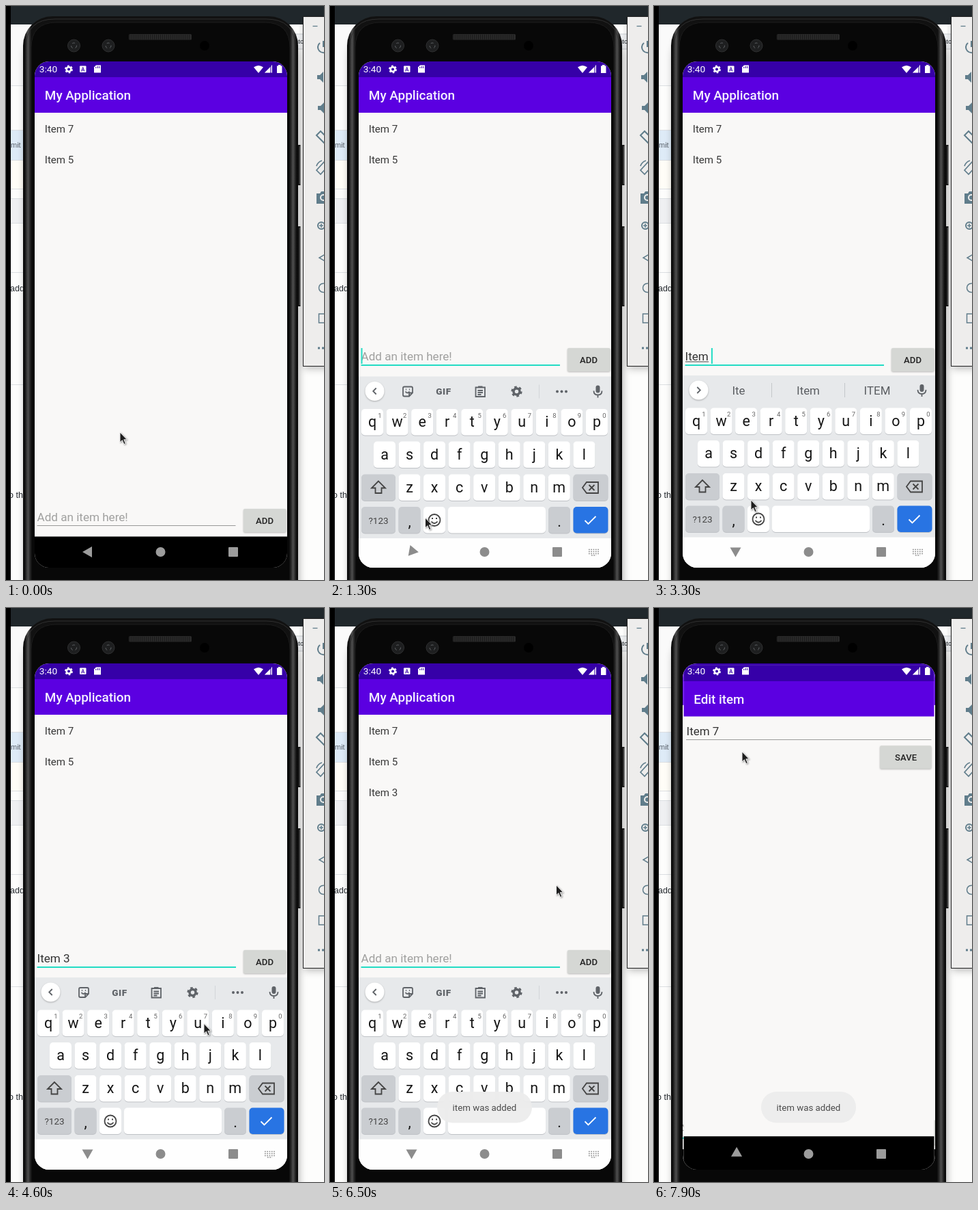
Write an HTML page that moves like this. It is 466x839 px and loops after 8 s.

```html
<!DOCTYPE html>
<html lang="en">
<head>
<meta charset="utf-8">
<title>Item list</title>
<style>
html, body { margin: 0; width: 100%; height: 100%; overflow: hidden; background: #fdfdfc; }
svg { display: block; width: 100vw; height: 100vh; }
text { font-family: Roboto, "Noto Sans", sans-serif; white-space: pre; }
.page { font-family: "Liberation Sans", Arial, sans-serif; font-size: 12.5px; fill: #24292e; }
.title { font-size: 18.95px; font-weight: 500; fill: #f6f2ff; }
.item { font-size: 15.1px; fill: #373737; }
.input { font-size: 17.1px; fill: #333; }
.button { font-size: 13.2px; font-weight: 500; fill: #222; text-anchor: middle; }
.raised { filter: drop-shadow(0 1px 1px #0004); }
.key { font-size: 21.5px; fill: #151515; text-anchor: middle; }
.digit { font-size: 9.5px; fill: #666; text-anchor: middle; }
.hint { font-size: 16.9px; fill: #5b5e62; text-anchor: middle; }
.line { fill: none; stroke: #5f6368; stroke-width: 1.8; }
.tool { fill: none; stroke: #607d8b; stroke-width: 2; }
#pointer { filter: drop-shadow(1px 1px 1px #0006); }
</style>
</head>
<body>
<svg viewBox="0 0 466 839" preserveAspectRatio="none">
  <defs>
    <clipPath id="screen"><rect x="42" y="81" width="370" height="740" rx="21"/></clipPath>
    <filter id="blur" x="-20%" width="140%"><feGaussianBlur stdDeviation="6"/></filter>
    <linearGradient id="rim" x1="25" x2="428" gradientUnits="userSpaceOnUse">
      <stop offset="0" stop-color="#050505"/><stop offset=".008" stop-color="#161616"/>
      <stop offset=".018" stop-color="#505050"/><stop offset=".03" stop-color="#111"/>
      <stop offset=".97" stop-color="#111"/><stop offset=".982" stop-color="#505050"/>
      <stop offset=".992" stop-color="#161616"/><stop offset="1" stop-color="#050505"/>
    </linearGradient>
    <g id="gear">
      <circle r="3.6" fill="none" stroke="currentColor" stroke-width="2.8"/>
      <circle r="5.5" fill="none" stroke="currentColor" stroke-width="2" stroke-dasharray="2.88"/>
    </g>
    <g id="window">
      <rect x="42" y="80" width="370" height="741" fill="#f9f8f7"/>
      <rect x="42" y="103" width="370" height="53" fill="#5b00e1"/>
      <rect x="42" y="80" width="370" height="24" fill="#3600a8"/>
    </g>
  </defs>

  <!-- desktop behind the emulator -->
  <rect width="466" height="839" fill="#fdfdfc"/>
  <rect x="7" y="27" width="30" height="89" fill="#fafafa"/>
  <rect x="7" y="181" width="30" height="44" fill="#deebf7"/>
  <rect x="7" y="225" width="30" height="42" fill="#fffdf7"/>
  <rect x="7" y="281" width="30" height="36" fill="#eff0f2"/>
  <path d="M7 116.5h30M7 181.5h30M7 225.5h30M7 267.5h30M7 281.5h30M7 317.5h30M7 389.5h30M7 553.5h30" stroke="#dcdfe2"/>
  <rect x="420" y="41" width="20" height="22" fill="#eff1f3" stroke="#ccd0d4"/>
  <rect x="28" y="36" width="401" height="850" rx="40" fill="#0005" filter="url(#blur)"/>
  <rect width="466" height="27" fill="#20272b"/>
  <rect width="7" height="839" fill="#000"/>
  <text class="page" x="7" y="207" style="font-size:11px;fill:#586069">mit</text>
  <text class="page" x="6" y="417">add</text>
  <text class="page" x="4" y="719">o th</text>
  <rect x="0" y="700" width="6" height="30"/>
  <text class="page" x="423" y="55" style="font-size:9.5px">atch</text>

  <!-- emulator toolbar -->
  <rect x="437" y="20" width="40" height="510" fill="#0004" filter="url(#blur)"/>
  <rect x="435.5" y="15.5" width="40" height="511" fill="#eeedec" stroke="#222"/>
  <g class="tool">
    <path d="M449.5 29.5h7" stroke-width="1.3"/>
    <path d="M460 54a8 8 0 1 0 10 0M465 51v9"/>
    <path d="M456 101v6h4l5 5v-16l-5 5zM457 146v6h4l5 5v-16l-5 5z" fill="#607d8b" stroke="none"/>
    <path d="M455 189l6-6 12 12-6 6z"/>
    <path d="M455 240l11-12 6 6-11 12zM455 234a12 12 0 0 1 8-8" stroke-width="1.7"/>
    <path d="M455 274h5l2-3h10v18h-17z" fill="#607d8b" stroke="none"/>
    <circle cx="465" cy="280" r="4" stroke="#eeedec"/>
    <circle cx="462" cy="321" r="5"/><path d="M459 321h6M462 318v6M466 325l4 4" stroke-width="1.5"/>
    <path d="M471 361l-12 7 12 7" stroke-width="1.5"/>
    <circle cx="465" cy="412" r="6.5" stroke-width="1.5"/>
    <rect x="458.5" y="450" width="13" height="13" stroke-width="1.5"/>
    <path d="M457 500h3M463 500h3" stroke-width="3"/>
  </g>

  <!-- phone body -->
  <path d="M429 203v59M429 322v117" stroke="#1a1a1a" stroke-width="5"/>
  <path d="M430.5 205v55M430.5 324v113" stroke="#555"/>
  <rect x="25" y="15" width="403" height="900" rx="43" fill="url(#rim)"/>
  <path d="M29.500 839V60Q29.500 19 72 19H381Q423.500 19 423.500 60V839" fill="none" stroke="#303030"/>
  <path d="M37 839V61Q37 24 74 24H379Q416 24 416 61V839" fill="#080808" stroke="#1c1c1c"/>
  <rect x="180" y="41" width="92" height="8.5" rx="1.5" fill="#292929"/>
  <path d="M181 45.25h90" stroke="#1b1b1b" stroke-width="7" stroke-dasharray="1 2"/>
  <g fill="#1e1f20" stroke="#303132"><circle cx="99.5" cy="58" r="9"/><circle cx="150" cy="58" r="9"/></g>
  <g fill="none" stroke="#606366" stroke-dasharray="4 4"><circle cx="99.5" cy="58" r="4"/><circle cx="150" cy="58" r="4"/></g>
  <circle cx="291" cy="58" r="7" fill="#000"/>

  <g clip-path="url(#screen)">
    <g id="home">
      <use href="#window"/>
      <text class="title" x="56.8" y="137">My Application</text>
      <text class="item" x="56.8" y="185">Item 7</text>
      <text class="item" x="56.8" y="230">Item 5</text>
      <text class="item" id="added" x="56.8" y="275">Item 3</text>
      <g id="entry">
        <text class="input" id="typed" x="45.5" y="753"></text>
        <rect id="composing" x="46" y="754.5" height="1" fill="#444"/>
        <rect id="underline" x="45.5"/>
        <rect id="caret" y="735" width="2" height="23" fill="#22dcc4"/>
        <rect class="raised" id="add" x="348" y="735" width="62.5" height="34" rx="2"/>
        <text class="button" x="379" y="757">ADD</text>
      </g>
      <rect id="navBar" x="42" y="775.5" width="370" height="46"/>
      <g id="keyboard">
        <rect x="42" y="540" width="370" height="236.5" fill="#e7e9eb"/>
        <circle class="raised" cx="65.5" cy="561.5" r="14" fill="#fff"/>
        <path class="line" id="chevron" d="M2.2-4.5l-4.5 4.5 4.5 4.5"/>
        <g id="tools" color="#5f6368">
          <path class="line" d="M107 557q0-2 2-2h10q2 0 2 2v7l-5 5h-7q-2 0-2-2zM121 564h-5v5M110.5 562q3 4 6 0M111 559h1M116 559h1"/>
          <text x="166.5" y="566.5" text-anchor="middle" font-size="13.5" font-weight="900" letter-spacing=".6" fill="#5f6368">GIF</text>
          <path class="line" d="M213.5 556h13.5v13.5h-13.5zM217 555h6.5M216.5 560.5h7.5M216.5 563.5h7.5M216.5 566.5h5"/>
          <use href="#gear" transform="translate(273.5 562) scale(1.25)"/>
          <path d="M306.5 552v20" stroke="#d2d5d8"/>
          <g fill="#5f6368"><circle cx="333" cy="562" r="2"/><circle cx="339.5" cy="562" r="2"/><circle cx="346" cy="562" r="2"/></g>
        </g>
        <g id="suggestions">
          <path d="M172.5 551v21M279.5 551v21" stroke="#c4c7ca"/>
          <text class="hint" x="124" y="568"></text>
          <text class="hint" x="226" y="568"></text>
          <text class="hint" x="327" y="568"></text>
        </g>
        <rect x="389.5" y="553" width="6" height="11" rx="3" fill="#5f6368"/>
        <path class="line" d="M386.5 561q0 6 6 6t6-6M392.5 567v4"/>
        <g id="keys"></g>
      </g>
    </g>

    <g id="edit">
      <use href="#window"/>
      <rect x="42" y="775" width="370" height="46.5"/>
      <text class="title" x="56.8" y="137">Edit item</text>
      <text class="input" x="46" y="184">Item 7</text>
      <path d="M45.5 190.3H408" stroke="#9b9b9b" stroke-width="1.2"/>
      <rect class="raised" x="332" y="199" width="76" height="34" rx="2" fill="#d5d7d4"/>
      <text class="button" x="370.3" y="221.5">SAVE</text>
    </g>

    <!-- status icons -->
    <g fill="#fff" color="#fff">
      <text x="48.8" y="97.3" font-size="13.7">3:40</text>
      <use href="#gear" transform="translate(92 92.5) scale(.92)"/>
      <rect x="108" y="87.5" width="9.5" height="9.5" rx="1"/>
      <path d="M110.5 95.5l2.2-6 2.2 6M111.3 93.8h2.8" fill="none" stroke="#3600a8"/>
      <path d="M132 86.5h7v11h-10v-8z"/>
      <path d="M131.8 89v2M134.3 88v3M136.8 88v3" stroke="#3600a8"/>
      <path d="M363 89.5q7-5 14 0l-7 8.5z"/>
      <path d="M390 86.5v11h-11z" opacity=".45"/><path d="M387 89.5v8h-8zM389 86.5h1v11h-1z"/>
      <path d="M397 87.5h2v-1.5h3.5v1.5h2v10.5h-7.5z"/>
    </g>

    <!-- navigation icons -->
    <g id="nav">
      <path id="back" d="M-7.5 0L6.5-8V8Z"/>
      <circle cx="226.5" cy="798" r="7"/>
      <rect x="326" y="791" width="14" height="14" rx="1"/>
      <path id="imeIcon" d="M379 794.5h15M379 797.5h15M379 800.5h15M383 803h7" stroke-width="1.6" stroke-dasharray="1.7 1.6"/>
    </g>

    <g id="toast">
      <rect x="157" y="707" width="139" height="45.5" rx="22.5" fill="#ededed" opacity=".95"/>
      <text x="226.5" y="735" font-size="13.3" fill="#4b4b4b" text-anchor="middle">item was added</text>
    </g>
  </g>

  <path id="pointer" d="M0 0V14.8L3.4 11.7L5.9 17.6L8.3 16.6L5.8 10.8H10.3Z" fill="#1d1d1d" stroke="#fff" stroke-width=".9"/>
</svg>

<script>
const LOOP = 8000, STEP = 100;
const $ = id => document.getElementById(id);
const set = (id, attrs) => {
  for (const name in attrs) $(id).setAttribute(name, attrs[name]);
};
const show = (id, on) => set(id, { opacity: +on });

function buildKeys() {
  const pitch = 36.55;
  const key = (x, y, w, fill = '#fff') =>
    `<rect x="${x}" y="${y + 1}" width="${w}" height="38.5" rx="5" fill="#bfc2c6"/>` +
    `<rect x="${x}" y="${y}" width="${w}" height="38.5" rx="5" fill="${fill}"/>`;
  const label = (x, y, s) => `<text class="key" x="${x}" y="${y}">${s}</text>`;
  const row = (letters, x0, y) => [...letters].map((c, i) => {
    const x = x0 + i * pitch;
    return key(x, y, 32) + label(x + 16, y + 26, c);
  }).join('');
  const digits = [...'1234567890'].map((d, i) =>
    `<text class="digit" x="${73 + i * pitch}" y="600">${d}</text>`).join('');
  const gray = '#cacdd1';
  $('keys').innerHTML =
    row('qwertyuiop', 46, 587.5) + digits + row('asdfghjkl', 64, 635) + row('zxcvbnm', 100.5, 683) +
    key(46, 683, 50, gray) + key(356.5, 683, 51, gray) +
    key(46, 730.5, 50, gray) + key(100.5, 730.5, 32, gray) + key(137, 730.5, 32) +
    key(173, 730.5, 143) + key(320, 730.5, 32, gray) + key(356.5, 730.5, 51, '#2874e3') +
    '<text x="71" y="755" font-size="13.5" fill="#444" text-anchor="middle">?123</text>' +
    label(116.5, 759, ',') + label(336, 759, '.') +
    `<g class="line" style="stroke:#444">
      <path d="M71 693l-10 10h5.5v7.5h9v-7.5h5.5z"/>
      <path d="M370 702.5l6-8h17v16h-17zM379.5 698.5l8 8m0-8l-8 8"/>
      <circle cx="153" cy="750" r="8.5"/>
      <path d="M148.5 752q4.5 5.5 9 0M149 747.5h2M155 747.5h2"/>
      <path d="M373.5 750.5l5 5 11-11" stroke="#fff"/>
    </g>`;
}

// Rows are [time, ...values]; values glide between rows.
function glide(rows, t) {
  const next = rows.findIndex(r => r[0] > t);
  if (next < 0) return rows.at(-1).slice(1);
  const a = rows[Math.max(0, next - 1)], b = rows[next];
  const k = Math.max(0, (t - a[0]) / (b[0] - a[0]));
  return a.slice(1).map((v, i) => v + (b[i + 1] - v) * k);
}
// Holds the value of the last row that has begun.
const hold = (rows, t) => rows.findLast(r => r[0] <= t)[1];

const pointerPath = [
  [0, 167, 623], [100, 150, 682], [200, 139, 727], [300, 139, 727], [700, 138.5, 748], [1300, 139.5, 748],
  [1500, 142, 722], [4100, 142, 722], [4300, 170, 701], [4800, 370, 545], [5000, 403, 517], [5300, 405, 519],
  [5500, 405, 519], [5800, 396, 504], [6400, 362, 440], [6800, 240, 300], [7200, 110, 188], [7300, 103, 182],
  [7400, 104, 181], [7700, 104, 181], [7900, 129, 210]
];
const typing = [[0, ''], [2400, 'I'], [2700, 'It'], [3000, 'Ite'], [3100, 'Item'], [3300, 'Item '], [4000, 'Item 3'], [5700, '']];
const caretStates = [
  [0, 0], [900, 1], [1500, 0], [2100, 1], [4500, 0], [5000, 1], [5300, 0],
  [5700, 1], [6300, 0], [6800, 1], [7300, 0]
];
const wordSets = [[0, []], [2700, ['It', "It's", 'Its']], [3000, ['Ite', 'Item', 'ITEM']], [3600, []]];
const advance = { I: 4.6, t: 5.6, e: 9, m: 14.9, ' ': 4.3, 3: 9.5 };
const keyboardDrop = [[1200, 30], [1300, 1.5], [1400, .5], [1500, 0]];
const backTurn = [[1100, 0], [1200, -15], [1300, -50], [1400, -78], [1500, -90], [7700, -90], [7800, -65], [7900, -30]];
const buttonShade = [[5500, 213], [5600, 198], [5800, 184], [6000, 213]];

const zoom = s => `translate(227 450) scale(${s}) translate(-227 -450)`;

function draw(t) {
  const focused = t >= 900, editing = t >= 7800;
  const open = t >= 1200 && !editing;
  const text = hold(typing, t);
  const widthOf = s => [...s].reduce((w, c) => w + advance[c], 0);

  set('pointer', { transform: `translate(${glide(pointerPath, t)})` });
  set('home', { transform: zoom(editing ? glide([[7800, 1.03], [7900, 1.048]], t)[0] : 1) });
  set('edit', { transform: zoom(glide([[7800, .955], [7900, .9915]], t)[0]) });
  show('edit', editing);

  set('entry', { transform: `translate(0 ${open ? -235 : 0})` });
  $('typed').textContent = text || 'Add an item here!';
  $('typed').style.fill = text ? '#333' : '#a0a09f';
  set('underline', focused
    ? { y: 759, width: 291.5, height: 2, fill: '#22dcc4' }
    : { y: 759, width: 291, height: 1, fill: '#989898' });
  set('composing', { width: t < 3600 ? widthOf(text.trim()) : 0 });
  set('caret', { x: 45.5 + widthOf(text), opacity: hold(caretStates, t) });
  const shade = Math.round(glide(buttonShade, t)[0]);
  set('add', { fill: `rgb(${shade},${shade + 2},${shade - 1})` });
  set('added', { opacity: glide([[5600, 0], [5800, .55], [6000, 1]], t)[0] });

  const words = t >= 2700 && t < 4200;
  show('keyboard', open);
  set('keyboard', { transform: `translate(0 ${glide(keyboardDrop, t)[0]})` });
  show('tools', !words);
  show('suggestions', words);
  document.querySelectorAll('.hint').forEach((el, i) => el.textContent = hold(wordSets, t)[i] || '');
  set('chevron', { transform: `translate(65.5 561.5) scale(${words ? -1 : 1} 1)` });

  set('navBar', { fill: open ? '#fefefe' : '#000' });
  set('nav', { fill: open ? '#8c8c8c' : '#9c9c9c' });
  set('back', { transform: `translate(119.5 798) rotate(${glide(backTurn, t)[0]})` });
  set('imeIcon', { stroke: open ? '#8c8c8c' : '#9c9c9c', opacity: +(focused && !editing) });
  set('toast', { opacity: glide([[5900, 0], [6200, 1]], t)[0] });
}

buildKeys();
const start = performance.now();
function tick(now) {
  const t = Math.max(0, now - start) % LOOP;
  draw(Math.floor(t / STEP) * STEP);
  requestAnimationFrame(tick);
}
draw(0);
requestAnimationFrame(tick);
</script>
</body>
</html>
```
